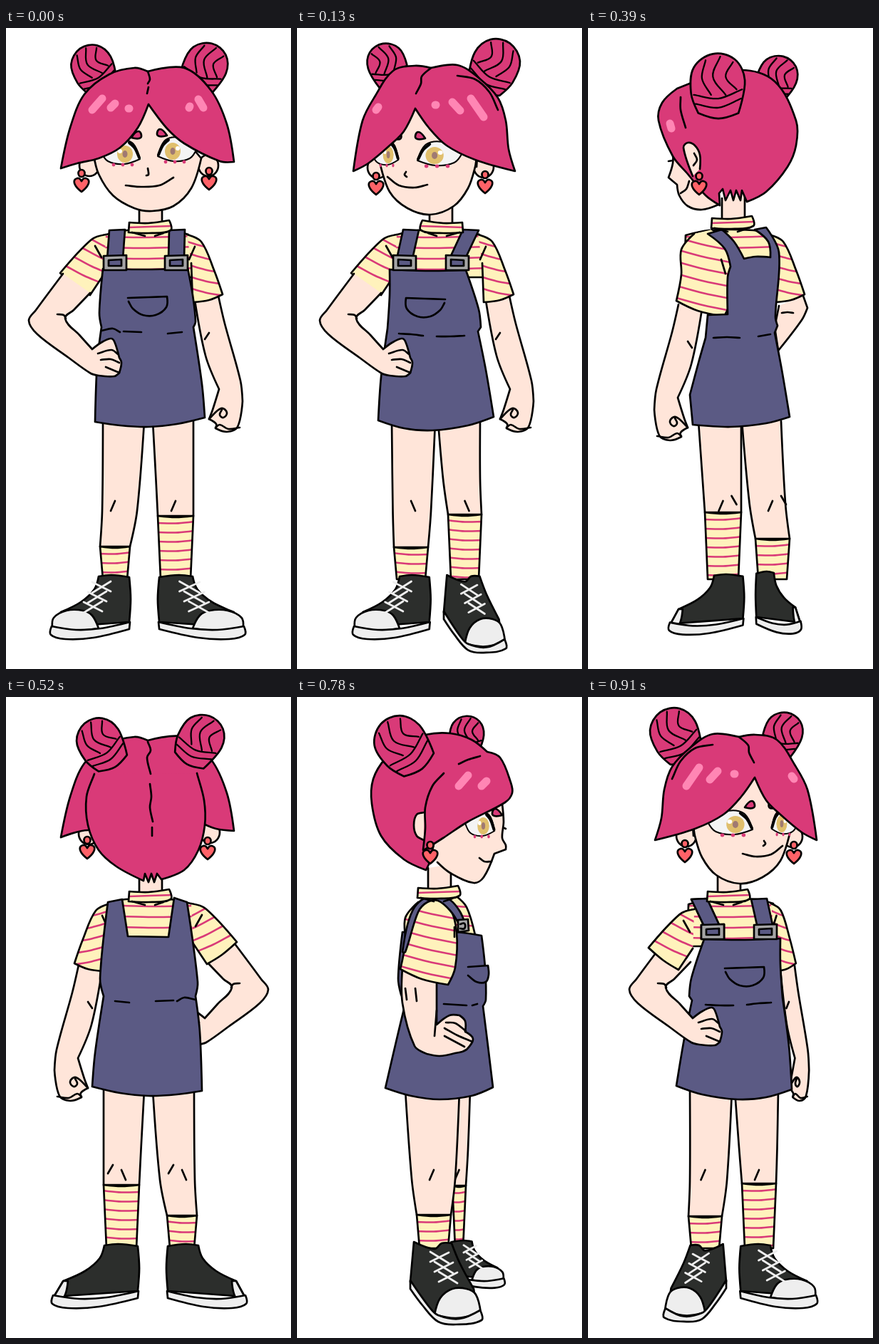
These frames come from a looping animation (400x900 px, 1040 ms). An HTML page with a canvas:

```html
<!DOCTYPE html>
<html>
<head>
<meta charset="utf-8">
<style>
html, body { margin: 0; overflow: hidden; background: #fff; }
canvas { display: block; }
</style>
</head>
<body>
<canvas id="stage" width="400" height="900"></canvas>
<script>
const g = document.getElementById('stage').getContext('2d');
const HAIR = '#d93a78', SHINE = '#ff86b4', SKIN = '#ffe5d9', CREAM = '#fff2bc', DENIM = '#5b5a84';
const BLACK = '#2c2e2c', WHITE = '#eee', GREY = '#a5a5a5', RED = '#ff6268', GOLD = '#e0bf6c';
g.lineCap = g.lineJoin = 'round';
let view = new DOMMatrix();

// Draws in a moved, scaled and turned frame; line widths stay the same.
function at(x, y, sx, sy, turn, draw) {
  const old = view;
  view = view.translate(x, y).scale(sx, sy).rotate(turn);
  draw();
  view = old;
}
const mirror = draw => at(400, 0, -1, 1, 0, draw);
const shift = (x, y, draw) => at(x, y, 1, 1, 0, draw);

// Smooth curve through "x y" points; "!" marks a corner, "z" closes, "/" starts a new part.
function curve(text) {
  const path = new Path2D(), placed = new Path2D();
  for (const part of text.split('/')) {
    const closed = part.endsWith('z');
    const pts = [...part.matchAll(/(-?[\d.]+) (-?[\d.]+)(!?)/g)].map(m => ({ x: +m[1], y: +m[2], sharp: m[3] }));
    const n = pts.length;
    const pt = i => closed ? pts[(i + n) % n] : pts[Math.min(Math.max(i, 0), n - 1)];
    const handle = (i, len) => {
      const a = pt(i - 1), b = pt(i + 1), d = Math.hypot(b.x - a.x, b.y - a.y);
      const k = pt(i).sharp || !d ? 0 : len / 3 / d;
      return [(b.x - a.x) * k, (b.y - a.y) * k];
    };
    path.moveTo(pts[0].x, pts[0].y);
    for (let i = 0; i < (closed ? n : n - 1); i++) {
      const p = pt(i), q = pt(i + 1), len = Math.hypot(q.x - p.x, q.y - p.y);
      const [ax, ay] = handle(i, len), [bx, by] = handle(i + 1, len);
      path.bezierCurveTo(p.x + ax, p.y + ay, q.x - bx, q.y - by, q.x, q.y);
    }
    if (closed) path.closePath();
  }
  placed.addPath(path, view);
  return placed;
}
function stroke(path, color = '#000', width = 2.7) {
  g.strokeStyle = color; g.lineWidth = width; g.stroke(path);
}
function fill(path, color) { g.fillStyle = color; g.fill(path); }
const line = (d, color, width) => stroke(curve(d), color, width);
function shape(color, d) {
  const path = curve(d);
  fill(path, color);
  stroke(path);
}
const skin = d => shape(SKIN, d), hair = d => shape(HAIR, d), denim = d => shape(DENIM, d);
const shine = d => line(d, SHINE, 11);
function striped(d, stripes) {
  const path = curve(d);
  fill(path, CREAM);
  g.save(); g.clip(path);
  line(stripes, HAIR, 2.6);
  g.restore();
  stroke(path);
}
function rows(x1, y1, x2, y2, n, dx, dy) {
  return Array.from({ length: n }, (_, i) => {
    const x = i * dx, y = i * dy;
    return `${x1 + x} ${y1 + y} ${(x1 + x2) / 2 + x} ${(y1 + y2) / 2 + y + 1.5} ${x2 + x} ${y2 + y}`;
  }).join('/');
}
function oval(x, y, rx, ry, color, outline) {
  const path = new Path2D(), placed = new Path2D();
  path.ellipse(x, y, rx, ry, 0, 0, 7);
  placed.addPath(path, view);
  fill(placed, color);
  if (outline) stroke(placed);
}
const ear = (x, y) => oval(x, y, 14, 15, SKIN, true);

function leg(hipL, hipR, l, r, top, back) {
  const y = top - 50, mid = (l + r) / 2;
  skin(`${hipL} 552! ${(hipL + l) / 2 + 1} ${y} ${l} ${top}! ${r} ${top}! ${(hipR + r) / 2} ${y} ${hipR} 552!`);
  line(`${mid} 664 ${mid - 6} 678`);
  if (back) line(`${mid + 12} 657 ${mid + 19} 669`);
  striped(`${l} ${top}! ${mid} ${top + 2} ${r} ${top}! ${r - 4} 774! ${l + 4} 774!z`, rows(l - 3, top + 10, r + 3, top + 8, 7, 0, 13));
}
function laces(x, y) {
  for (let i = 0; i < 3; i++, x -= 6, y += 14)
    line(`${x} ${y} ${x + 26} ${y + 13}/${x + 26} ${y - 1} ${x} ${y + 15}`, WHITE, 2.8);
}
function sideShoe(x, y, sx, sy, back) {
  at(x, y, sx, sy, 0, () => {
    shape(BLACK, '67 2! 61 20 42 38 14 52! 2 74! 110 66! 112 34 110 3! 85 0z');
    shape(WHITE, back ? '2 74! 14 52! 20 52! 14 76z' : '2 74! 4 60 22 50 45 50 58 57 67 75! 32 78z');
    shape(WHITE, '1 72! 0 84 20 90 60 88 110 76! 111 66! 70 75 35 77z');
    if (!back) laces(58, 10);
  });
}
function frontShoe(x, y, sx, sy) {
  at(x, y, sx, sy, 0, () => {
    shape(BLACK, '42 2! 31 29 11 66! 6 99! 66 104! 83 84 100 56! 95 0! 66 10 56 2z');
    shape(WHITE, '1 100! 8 74 21 66 41 66 58 79 66 102! 36 107z');
    shape(WHITE, '2 96! 0 110 36 116 61 112 83 89 100 66! 100 54! 73 92 61 103 31 108z');
    laces(46, 15);
  });
}

function hangArm() {
  skin('298 376! 307 415 329 495 332 524! 325 560 310 567 294 562! 295 556 285 549! 290 536 299 507! 280 460 264 376!');
  line('285 549 302 534 310 540 305 547 300 543 303 536/294 561 300 557 312 563 328 561/285 428 279 437');
}
function hipArm() {
  skin('80 345! 42 396 32 411 44 430 88 463 119 485 130 488! 152 489 159 484! 162 470 159 463! 152 440 147 436 133 442 121 451! 103 431 83 408 95 396 118 372!');
  line('72 402 81 403 84 408/129 457 148 452 157 458/133 466 147 465 159 470/140 476 159 484');
}
function hipSleeve() {
  striped('140 290! 120 297 76 344! 97 362 118 375! 138 345!', rows(84, 334, 134, 358, 4, 11, -13));
  line('125 306 134 322');
}
function hangSleeve() {
  striped('254 290! 274 300 292 340 304 374! 285 382 262 385! 260 330!', rows(254, 300, 306, 312, 5, 0, 16));
  line('265 307 257 325');
}
function sideSleeve() {
  striped('170 288! 152 310 152 345 145 382! 175 396 212 404! 222 380 224 330 214 295 195 282', rows(142, 292, 226, 312, 6, 0, 17));
}
const torso = () => striped('137 291! 170 284 232 284 256 290! 265 350! 135 350!z', rows(135, 293, 265, 292, 4, 0, 15));
function collar(dx, dy) {
  shift(dx, dy, () => {
    skin('187 245! 187 275! 219 273! 219 240!');
    striped('173 273! 200 274 229 270! 231 284 200 288 172 287!z', '172 280 232 278');
    line('177 287 195 292/209 292 221 288');
  });
}

function overalls(top) {
  denim(top + ' 263 420! 275 500 279 547! 240 556 200 560 160 558 125 553! 128 470 134 420! 131 400z');
  line('134 425 150 422 160 427/165 426 190 427/227 429 247 427');
}
function strap(x, end) {
  denim(`${x - 11} 284! ${x + 11} 283! ${end + 11} 324! ${end - 11} 324!z`);
  const box = (color, w, h) => shape(color, `${end - w} ${330 - h}! ${end + w} ${329 - h}! ${end + w} ${330 + h}! ${end - w} ${330 + h}!z`);
  box(GREY, 16, 10);
  box(DENIM, 9, 4);
}
const pocket = () => line('171 379! 200 378 226 377! 225 392 210 403 192 403 178 394 172 384');

function bun(x, y, size, turn) {
  at(x, y, size, size, turn, () => {
    hair('-22 34! -30 12 -27 -16 -6 -31 18 -25 29 -2 22 34! 0 40z');
    line('-27 14 0 18 26 8/-25 24 0 28 25 18/-14 -24 -18 -4 -8 14/2 -28 -6 -6 8 14/16 -22 8 -6 20 8', '#000', 2.3);
  });
}
function earring(x, y) {
  oval(x, y - 16, 4.5, 5, RED, true);
  shift(x, y, () => shape(RED, '0 -5! 4 -9 10 -6 8 2 0 10! -8 2 -10 -6 -4 -9z'));
}
function eye(x, y, sx) {
  at(x, y, sx, 1, 0, () => {
    const white = curve('-28 -4! -18 10 5 14 27 7! 16 -16 -8 -18z');
    fill(white, '#f4f4f4');
    oval(6, 0, 11, 12, GOLD);
    oval(6, 0, 3.5, 5, '#a07a72');
    oval(-1, -4, 3, 3, '#fff');
    stroke(white, '#000', 2);
    line('12 -16 20 -8 26 5', '#000', 4);
    for (const dot of [-10, 3, 16]) oval(dot, 15, 2.4, 2.4, HAIR);
  });
}
const brow = (x, y, sx) => at(x, y, sx, 1, 0, () => hair('-6 4! 4 -5 7 4z'));

function frontBody(back) {
  leg(136, 194, 132, 174, 728, back);
  leg(206, 263, 213, 263, 685, back);
  sideShoe(63, 768, 1, 1, back);
  sideShoe(335, 768, -1.09, 1, back);
  hangArm();
  if (back) hipArm();
  torso(); hipSleeve(); hangSleeve();
  if (back) return overalls('146 288! 164 282! 172 337! 229 336! 237 284! 257 288! 268 395');
  overalls('136 338! 200 339 255 337! 262 375 266 412');
  strap(156, 153);
  strap(240, 239);
  pocket();
  hipArm();
}
const crown = '77 197! 90 140 110 93 145 65 180 56 199 61! 250 56 288 88 310 135 320 188! ';
function front() {
  frontBody();
  collar(0, 0);
  ear(117, 193); ear(284, 193);
  skin('123 178! 130 205 150 235 180 253 205 257 235 250 260 225 274 183! 200 95!');
  eye(161, 177, 1); eye(240, 173, -1);
  brow(182, 150, 1); brow(220, 147, -1);
  line('199 197 200 206 197 207/168 221 190 223 215 221 235 210');
  bun(122, 54, .98, -25); bun(281, 53, 1.02, 25);
  hair(crown + '300 187 250 162 225 140 200 107! 185 140 160 168 130 183 100 190z');
  line('199 61 202 72 199 78/200 83 198 92');
  shine('121 115 135 99/147 112 153 106/172 113 173 113/257 112 258 110/270 100 277 112');
  earring(106, 220); earring(285, 217);
}
function back() {
  mirror(() => frontBody(true));
  collar(0, 0);
  ear(116, 192); ear(286, 190);
  hair(crown + '295 185 277 178! 200 200 116 187z');
  const nape = curve('124 108 113 140 115 180 130 215 155 238 193 258! 195 248! 200 260! 204 248! 208 260! 212 248! 218 256! 250 243 270 215 279 180 278 145 268 107');
  fill(nape, HAIR);
  stroke(nape);
  line('199 63 203 75 198 85 203 108/202 122 204 140 202 155 206 175/205 183 205 195');
  bun(132, 62, 1.05, -30); bun(275, 58, 1.05, 30);
  earring(114, 217); earring(283, 218);
}

function side(nearTop, farTop, arm) {
  leg(225, 243, 218, 237, farTop);
  sideShoe(291, 763, -.68, .74);
  leg(152, 228, 168, 216, nearTop);
  frontShoe(259, 765, -1, 1);
  striped('224 280! 238 295 250 334! 190 335! 190 285!z', rows(190, 288, 256, 296, 4, 0, 13));
  denim('148 330! 142 395 146 418! 152 430! 140 480 124 549! 160 560 200 565 245 560 275 548! 268 490 261 434! 265 425 264 380 259 335! 222 330z');
  denim('240 379! 268 377! 269 390 265 400 252 400 240 391');
  line('206 431 238 433/246 433 253 431');
  arm();
  sideSleeve();
  denim('148 358! 155 320 165 295 180 282 198 278 215 285 228 300 236 318! 228 320! 215 300 198 286 183 288 170 302 152 358z');
  shape(GREY, '226 313! 240 312! 241 328! 226 330!z');
  line('229 319 235 318 235 325 229 325/221 323 221 337');
  collar(-3, -5);
  skin('197 232! 215 247 248 261 262 253 277 220! 293 214! 293 208 288 198 290 175 288 150! 180 150! 180 215!');
  eye(257, 181, .75);
  brow(282, 162, -1);
  line('291 184 293 185/256 226 263 231 273 231');
  bun(239, 52, .8, 8);
  hair('181 243! 150 228 118 195 105 150 107 115 125 85 150 65 180 53 215 51 245 60 267 77! 285 85 300 120 302 135 292 148 240 175 205 198 178 215! 192 207! 185 235!z');
  skin('179 162 168 165 164 180 168 195 178 201');
  line('206 107 190 125 180 155 180 185 177 215/227 94 240 88 257 83');
  shine('227 125 240 110/259 125 266 118');
  bun(146, 63, 1.2, -38);
  earring(187, 224);
}
function bentArm() {
  skin('148 380! 148 430 165 490 182 501! 200 504 222 500! 232 498 238 495! 247 480 236 470! 236 455 228 447! 214 447 196 460! 196 400!');
  line('196 440 193 476/209 457 222 458 237 469/207 465 225 475 246 484/207 476 235 491/152 409 154 425/166 409 168 427');
}
function straightArm() {
  skin('206 396! 202 440 197 517! 212 540 214 562! 203 578! 185 575 164 581! 157 558! 167 510 163 392!');
  line('204 551 204 562/201 430 190 422');
}

function backTurned(leftTop, rightTop, farArm, nearArm) {
  leg(155, 215, 164, 215, leftTop, true);
  leg(216, 271, 235, 283, rightTop, true);
  sideShoe(114, 767, .94, .94, true);
  sideShoe(299, 763, -.57, .97, true);
  nearArm();
  farArm();
  torso(); hangSleeve();
  shift(-21, 1, sideSleeve);
  denim('168 289! 188 283! 205 300 219 324! 235 321 256 322! 253 300 234 283! 250 280! 268 315 263 405 266 418! 262 428! 272 480 283 546! 250 555 200 560 147 557! 143 515! 155 470 165 435! 168 403! 196 402! 196 350 200 335! 192 310z');
  line('176 435 195 434 213 435/239 433 256 430/187 325 193 345');
  collar(1, -6);
  skin('119 172! 119 190 113 210! 125 220! 128 235 140 250 160 255 183 248! 180 180!');
  line('113 187 119 186/130 232 138 226 142 215');
  bun(267, 68, .92, 25);
  hair('125 85! 104 105 99 130 119 180 140 205 165 235 185 249! 184 232! 189 226! 193 242! 200 228! 204 242! 208 228! 214 242! 216 228! 223 244! 250 230 280 195 292 165 292 130 262 75 215 59 150 75!z');
  line('130 97 130 115 137 140');
  shine('115 134 117 141');
  skin('147 208! 134 168 140 161 150 165 157 178 157 198!');
  line('149 176 153 185 148 193');
  bun(183, 76, 1.28, 0);
  earring(156, 224);
}
const backLeft = () => backTurned(680, 717, () => {
  skin('302 376! 308 393! 300 410 267 453! 262 420! 268 390!');
  line('272 400 280 399 288 400');
}, () => shift(25, 12, () => mirror(hangArm)));
const backRight = () => mirror(() => backTurned(717, 680, hangArm,
  () => skin('119 388! 104 412 110 440 130 466 155 485! 168 480 174 465! 158 450! 146 432 160 400!')));

function turnedLegs(leftTop, rightTop) {
  leg(143, 202, 141, 188, leftTop);
  leg(206, 267, 216, 264, rightTop);
  frontShoe(107, 768, .87, .94);
  sideShoe(321, 768, -.97, 1);
}
function turnedDress() {
  denim('163 340! 215 341 270 339! 270 375 273 422! 282 490 286 551! 250 562 210 565 160 558 124 546! 135 480 146 426! 142 420! 145 395z');
  strap(156, 175);
  strap(240, 249);
  shift(21, 2, pocket);
  line('165 432 185 433 204 433/223 432 240 430 257 429');
}
function turnedHead() {
  collar(-5, 0);
  ear(138, 195); ear(287, 196);
  skin('148 178! 150 195 160 225 180 250 213 262 245 253 270 230 284 188! 233 100!');
  line('147 180 148 195');
  eye(200, 179, 1.15); eye(276, 178, -.68);
  brow(226, 151, 1); brow(260, 151, -.8);
  line('247 202 249 206 246 209/217 220 235 224 257 221 273 209');
  bun(122, 50, 1.12, -25); bun(275, 50, .9, 20);
  hair('94 201! 103 170 107 130 118 98 145 70 175 52 212 56! 235 53 265 60 290 95 308 130 321 201! 300 190 270 165 250 145 234 113! 215 140 190 165 150 185z');
  line('212 56 225 68 226 78 233 92/175 67 150 72 130 90 118 115');
  shine('138 125 156 99/171 116 182 104/205 108 206 108/286 111 289 115');
  earring(136, 222); earring(289, 224);
}
function turnedRight() {
  turnedLegs(729, 683);
  at(111, 0, .6, 1, 0, hangArm);
  shift(4, 0, torso);
  shift(9, 8, hipSleeve);
  at(79, 0, .7, 1, 0, hangSleeve);
  turnedDress();
  shift(26, 0, hipArm);
  shift(9, 8, hipSleeve);
  strap(156, 175);
  turnedHead();
}
function turnedLeft() {
  mirror(() => turnedLegs(683, 729));
  hangArm();
  torso(); hipSleeve(); hangSleeve();
  mirror(turnedDress);
  hipArm();
  mirror(turnedHead);
}

const poses = [
  front, turnedLeft, () => mirror(() => side(684, 722, straightArm)), backLeft,
  back, backRight, () => side(727, 686, bentArm), turnedRight,
];
let shown = -1;
function tick() {
  const pose = Math.floor(performance.now() / 130) % poses.length;
  if (pose !== shown) {
    g.fillStyle = '#fff';
    g.fillRect(0, 0, 400, 900);
    poses[shown = pose]();
  }
  requestAnimationFrame(tick);
}
tick();
</script>
</body>
</html>
```
